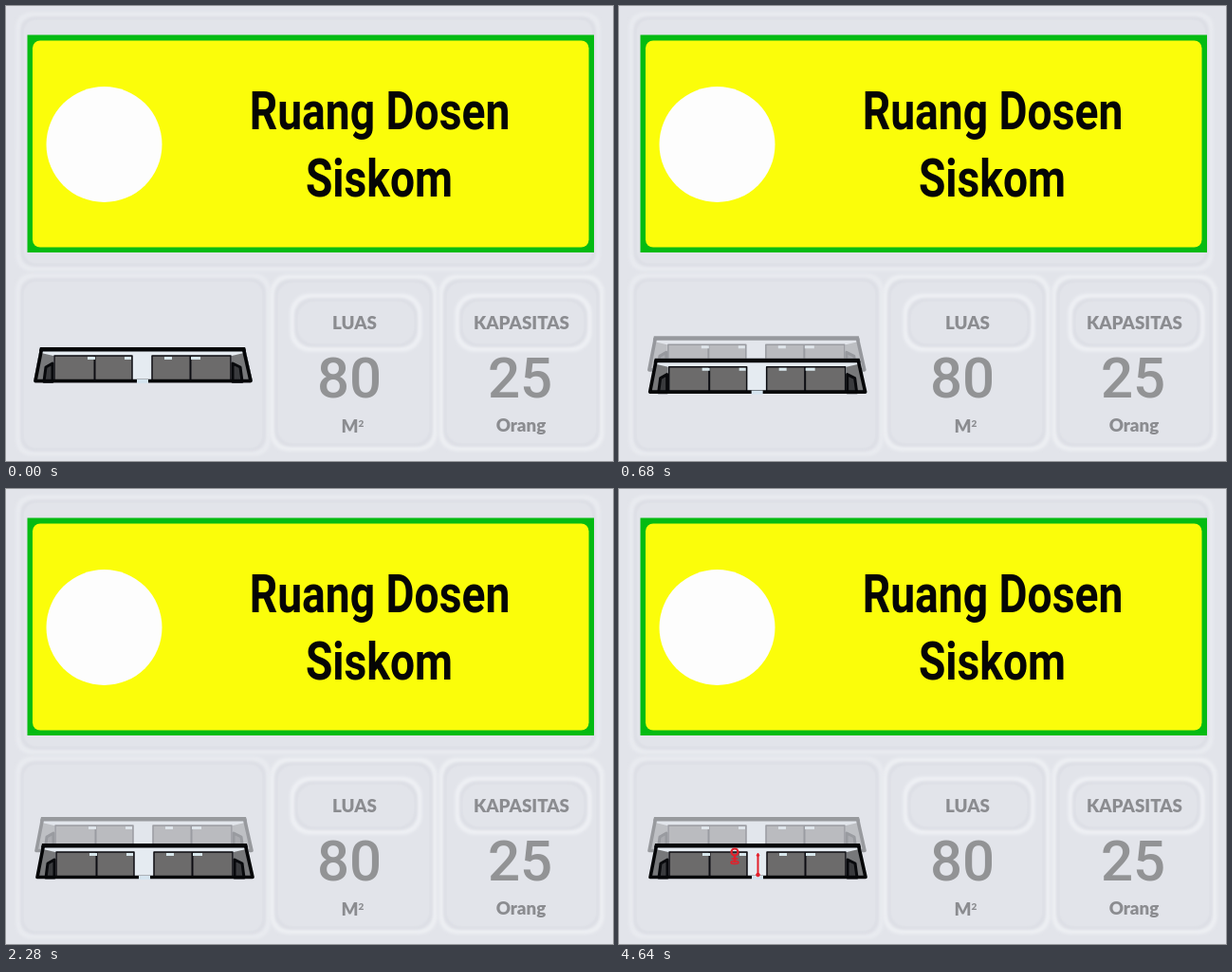
These frames come from a looping animation (640 px wide and 480 px high, 5080 ms). An HTML page:

```html
<!DOCTYPE html>
<html lang="id">
<head>
<meta charset="utf-8">
<title>Ruang Dosen</title>
<style>
  html, body { margin: 0; width: 100%; height: 100%; overflow: hidden; background: #e2e4ea; }
  svg { display: block; width: 100%; height: 100%; }
  text { text-anchor: middle; }
  .title { font: 650 55px Roboto, sans-serif; fill: #050505; }
  .label { font: 900 18.8px Lato, sans-serif; fill: #8b8c90; }
  .value { font: 500 60px Roboto, sans-serif; fill: #929395; }
</style>
</head>
<body>
<svg viewBox="0 0 640 480">
  <defs>
    <filter id="soft" x="-10%" y="-20%" width="120%" height="140%"><feGaussianBlur stdDeviation="1.8"/></filter>
    <g id="room" stroke-linejoin="round">
      <path d="M38 374H254L262 411H31Z" fill="#e5ebf1"/>
      <path d="M39 380L52 383V409H33Z M253 380L240 383V409H260Z" fill="#77787a"/>
      <path d="M53 383H135V409H53Z M156 383H239V409H156Z" fill="#6c6b6b" stroke="#0c0d12" stroke-width="1.5"/>
      <path d="M95.500 383V409M196.500 383V409" stroke="#0c0d12" stroke-width="2"/>
      <path d="M42 410L44 395L51 391V410Z M251 410L249 395L241 391V410Z" fill="#3a3b3e" stroke="#08090c" stroke-width="3"/>
      <path d="M88 384H96V387H88Z M127 384H134V387H127Z M169 384H177V387H169Z M197 384H207V387H197Z" fill="#d7e6eb"/>
      <path d="M39.500 376L33 409.500H260L252.500 376" fill="none" stroke="#050608" stroke-width="3.600"/>
      <path d="M38 374H254L255 378.500H37Z" fill="#050608"/>
      <path d="M140 408H152V412H140Z" fill="#d5e4ef"/>
    </g>
  </defs>
  <rect width="640" height="480" fill="#e2e4ea"/>
  <g id="cards"></g>

  <rect x="22.500" y="30.500" width="597.500" height="229.500" fill="#04bb12"/>
  <rect x="28" y="36.500" width="586.500" height="218" rx="8" fill="#fbfd0a"/>
  <circle cx="103.500" cy="146" r="61" fill="#fdfdfd"/>
  <g class="title">
    <text transform="translate(394 130) scale(.84 1)">Ruang Dosen</text>
    <text transform="translate(393.500 201) scale(.84 1)">Siskom</text>
  </g>

  <text class="label" x="367.500" y="340.500">LUAS</text>
  <text class="value" x="362" y="413">80</text>
  <text class="label" x="365.500" y="450">M<tspan font-size="10" dy="-6">2</tspan></text>
  <text class="label" x="543.500" y="340.500">KAPASITAS</text>
  <text class="value" x="542" y="413">25</text>
  <text class="label" x="543" y="448.500">Orang</text>

  <use id="upper" href="#room"/>
  <use id="lower" href="#room"/>
  <g id="marks" fill="none" stroke="#e3202b">
    <g id="pin">
      <circle cx="122" cy="384" r="3.500" stroke-width="2.200"/>
      <path d="M122 388V395" stroke-width="2.500"/>
      <path d="M118.500 391H125.500" stroke-width="1.500"/>
      <ellipse cx="122" cy="395" rx="4" ry="1.500" stroke-width="1.500"/>
    </g>
    <path d="M146.500 386V407" stroke-width="2"/>
    <path d="M145 387L146.500 384L148 387Z" fill="#e3202b" stroke-width="1"/>
    <circle cx="146.500" cy="407" r="1.800" fill="#e3202b" stroke-width="1"/>
  </g>
</svg>
<script>
  const LOOP = 5080, RISE = 820, GAP = 14;
  const el = id => document.getElementById(id);
  const clamp = v => Math.max(0, Math.min(1, v));

  // Soft raised panels: a faint shade inside a pale rim.
  const panel = (x, y, w, h, r, rim) => {
    const box = (d, attrs) =>
      `<rect x="${x + d}" y="${y + d}" width="${w - 2 * d}" height="${h - 2 * d}" rx="${r}" ${attrs}/>`;
    return box(0, `fill="none" stroke="${rim}" stroke-width="5" filter="url(#soft)"`) +
      box(4, 'fill="none" stroke="#dadce3" stroke-width="2.500" filter="url(#soft)"') +
      box(6, 'fill="#e2e4ea"');
  };
  el('cards').innerHTML = [
    [13, 9, 611, 268, 14, '#e9ebf0'],
    [13, 285, 263, 187, 14, '#e9ebf0'],
    [281, 286, 171, 181, 16, '#edeff3'],
    [459, 286, 169, 181, 16, '#edeff3'],
    [302, 306, 134, 56, 18, '#eef0f4'],
    [476, 306, 139, 56, 18, '#eef0f4']
  ].map(p => panel(...p)).join('');

  const place = (id, x, y) => el(id).setAttribute('transform', `translate(${x} ${y})`);

  // The two storeys part, the upper one fades, then the markers appear.
  function draw(t) {
    const open = clamp(t / RISE);
    place('upper', open - 2, -GAP * (1 + open));
    place('lower', 2 * open - 2, -GAP * (1 - open));
    el('upper').setAttribute('opacity', 0.33 + 0.67 * Math.exp(-t / 150));
    el('marks').setAttribute('opacity', clamp((t - 2480) / 440));
    place('pin', 0, -clamp((t - 3080) / 200));
  }

  const start = performance.now();
  function tick() {
    draw((performance.now() - start) % LOOP);
    requestAnimationFrame(tick);
  }
  tick();
</script>
</body>
</html>
```
